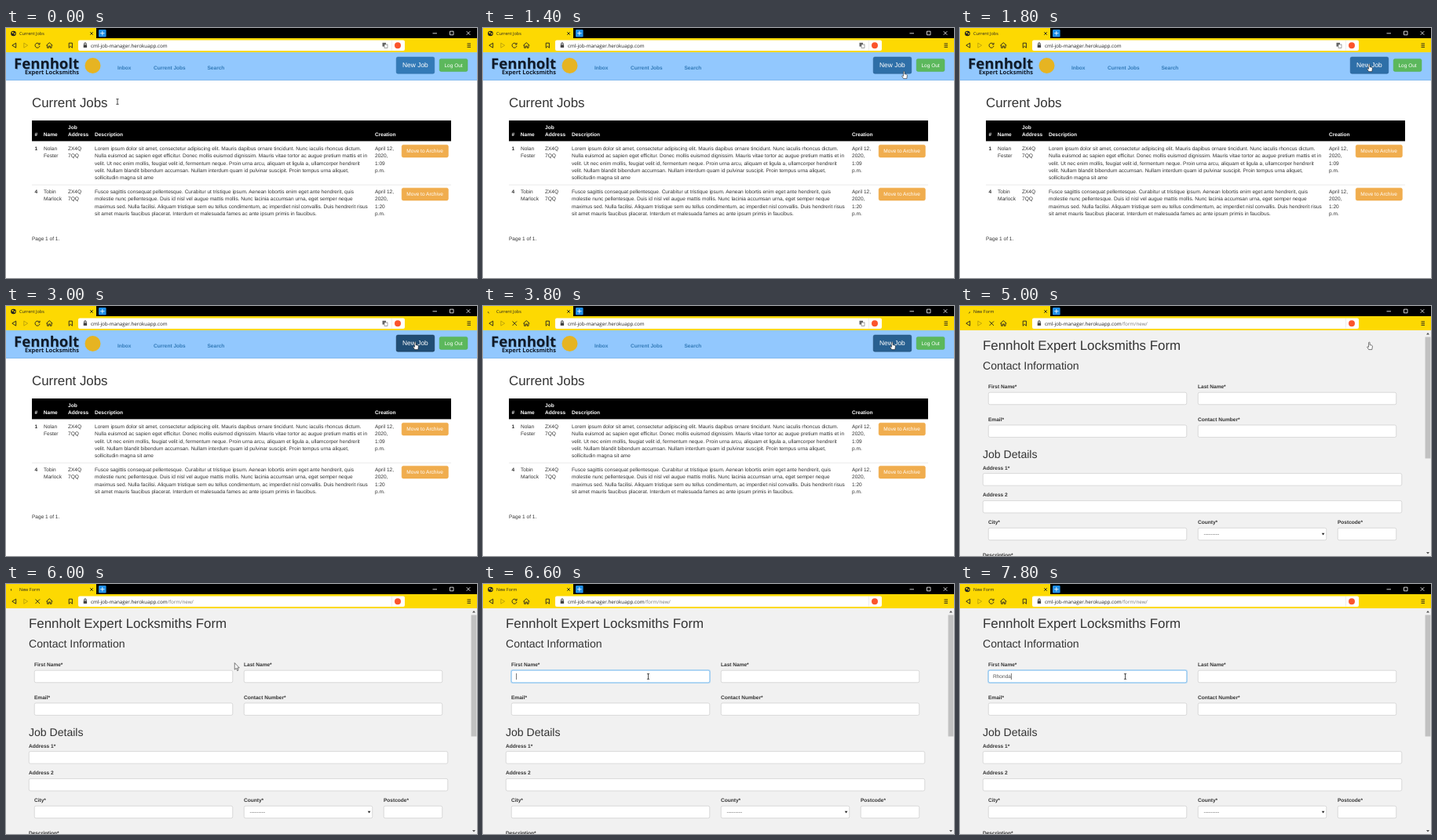
These frames come from a looping animation (600x319 px, 8000 ms). An HTML page:

```html
<!DOCTYPE html>
<html lang="en">
<head>
<meta charset="utf-8">
<title>Job manager</title>
<style>
  html, body { margin: 0; width: 100%; height: 100%; overflow: hidden; background: #fff; }
  svg { display: block; width: 100%; height: 100%; }
  text { font: 6.56px "Liberation Sans", Arial, sans-serif; fill: #333; text-rendering: geometricPrecision; }
  .b { font-weight: bold; }
  .white { fill: #fff; }
  .nav { font-weight: bold; fill: #337ab7; }
  .h1 { font-size: 16.87px; }
  .h2 { font-size: 14.06px; }
  .big { font-size: 8.43px; fill: #fff; }
  .grey { fill: #555; }
  .ui { font: 5.5px "Open Sans", sans-serif; fill: #222; }
  .url { font: 6.28px "Open Sans", sans-serif; fill: #222; }
  .path { fill: #777; }
  .logo { font: bold 18.6px "Open Sans", sans-serif; fill: #101a28; }
  .tagline { font: bold 7.5px "Open Sans", sans-serif; fill: #101a28; }
  .line { fill: none; stroke: #222; stroke-width: .9; }
  .pale { fill: none; stroke: #fff; stroke-width: .8; }
</style>
</head>
<body>
<svg id="stage" viewBox="0 0 600 319" preserveAspectRatio="none"></svg>
<script>
const LOOP = 8000, STEP = 200, LINE = 9.37;
const PRESS = 3000, RELEASE = 3200, COMMIT = 4800, SHOW_FORM = 5000, FOCUS = 6600;
const TYPED = 'Rhonda';

const text = (x, y, s, cls = '') => `<text x="${x}" y="${y}" class="${cls}">${s}</text>`;
const lines = (x, y, list, cls) => list.map((s, i) => text(x, y + i * LINE, s, cls)).join('');
const box = (x, y, w, h, fill, extra = '') =>
  `<rect x="${x}" y="${y}" width="${w}" height="${h}" fill="${fill}" ${extra}/>`;
const path = (d, cls = 'line', extra = '') => `<path d="${d}" class="${cls}" ${extra}/>`;
const group = (id, content, extra = '') => `<g id="${id}" ${extra}>${content}</g>`;
const button = (x, y, w, h, fill, border, extra = '') =>
  box(x, y, w, h, fill, `rx="2" stroke="${border}" stroke-width=".5" ${extra}`);
const field = (x, y, w, extra = '') =>
  box(x + .25, y + .25, w - .5, 15.5, '#fff', `rx="1.9" stroke="#c4c4c4" stroke-width=".6" ${extra}`);

function browserBar() {
  return box(0, 0, 600, 14, '#000') + box(0, 0, 115, 14, '#fdd902') + box(0, 13, 600, 18, '#fdd902')
    + group('globe', '<circle cx="9.5" cy="7" r="3.3" fill="#222"/>'
      + path('M7.3 5.6L9 4.8 9.8 6 8.4 7.4ZM10.4 6.5L12 6.2 11.3 8.6 10 8.3Z', '', 'fill="#fdd902"'))
    + group('spinner', path('M9.5 4A3 3 0 0 1 11.5 4.8', 'line'))
    + text(17, 9, '', 'ui').replace('<text', '<text id="tabTitle"')
    + path('M107.2 5.2L110.8 8.8M110.8 5.2L107.2 8.8')
    + box(118, 2, 9.6, 9.4, '#1f8fe8', 'rx="1.2"') + path('M122.8 4V9.4M120.1 6.7H125.5', 'pale')
    + path('M543.5 6.8H549M565.5 4.2H570V8.8H565.5ZM586.7 4.2L591.3 8.8M591.3 4.2L586.7 8.8', 'pale')
    + path('M12.7 19.2V25.2L7.8 22.2Z')
    + path('M22.8 19.2V25.2L27.6 22.2Z', 'line', 'opacity=".3"')
    + group('reload', path('M42.5 20.5A3 3 0 1 0 43 22.8M43 18.8V21H40.8'))
    + group('stop', path('M37.5 19.5L43 25M43 19.5L37.5 25'))
    + path('M51.3 22.3L55.3 18.7 59.3 22.3M52.6 21.6V25.3H54.4V23H56.2V25.3H58V21.6')
    + path('M80.2 19.2H84.4V25.3L82.3 23.3 80.2 25.3Z')
    + box(92, 15.6, 416, 13.4, '#fff', 'rx="2"')
    + box(98.7, 21.4, 4.4, 3.6, '#444') + path('M99.7 21.5V20A1.2 1.2 0 0 1 102.1 20V21.5')
    + `<text x="108" y="24.5" class="url">cml-job-manager.herokuapp.com<tspan id="urlPath" class="path">/form/new/</tspan></text>`
    + group('translate', box(479.5, 18.8, 4.5, 4.8, '#666') + box(482, 21, 4, 4.4, '#fff', 'stroke="#666" stroke-width=".6"'))
    + box(491, 16, .5, 12.6, '#ddd') + '<circle cx="499" cy="22.2" r="4" fill="#fb542b"/>'
    + path('M587.5 20H592M587.5 22.2H592M587.5 24.4H592');
}

function jobRow(y, id, name, date, description) {
  return text(36.5, y, id, 'b') + lines(48, y, name) + lines(79, y, ['ZX4Q', '7QQ'])
    + lines(113, y, description) + lines(470, y, date)
    + button(504.2, y - 6.8, 59.2, 15.8, '#f0ad4e', '#eea236') + text(510.3, y + 3.4, 'Move to Archive', 'white');
}

function jobsPage() {
  return box(0, 31, 600, 288, '#fff') + box(0, 31, 600, 36, '#92c8fe') + box(0, 66.3, 600, .7, '#80b5e8')
    + text(10.8, 53, 'Fennholt', 'logo').replace('<text', '<text style="fill:#6c9ac4"')
    + text(10, 52.2, 'Fennholt', 'logo') + text(24, 59.3, 'Expert Locksmiths', 'tagline')
    + '<circle cx="110.5" cy="48" r="10" fill="#e6b422"/>'
    + text(142, 53, 'Inbox', 'nav') + text(188, 53, 'Current Jobs', 'nav') + text(256.5, 53, 'Search', 'nav')
    + button(497.2, 37, 48.6, 21.2, '#337ab7', '#2e6da4', 'id="newJob"') + text(505, 50.3, 'New Job', 'big')
    + button(552.2, 39.4, 35.8, 16, '#5cb85c', '#4cae4c') + text(558.4, 49.8, 'Log Out', 'white')
    + text(33, 100.7, 'Current Jobs', 'h1')
    + box(33, 118, 534, 26.4, '#000')
    + text(36.5, 138.2, '#', 'b white') + text(47.8, 138.2, 'Name', 'b white')
    + lines(79, 128.8, ['Job', 'Address'], 'b white')
    + text(113, 138.2, 'Description', 'b white') + text(470, 138.2, 'Creation', 'b white')
    + jobRow(156, '1', ['Nolan', 'Fester'], ['April 12,', '2020,', '1:09', 'p.m.'], [
      'Lorem ipsum dolor sit amet, consectetur adipiscing elit. Mauris dapibus ornare tincidunt. Nunc iaculis rhoncus dictum.',
      'Nulla euismod ac sapien eget efficitur. Donec mollis euismod dignissim. Mauris vitae tortor ac augue pretium mattis et in',
      'velit. Ut nec enim mollis, feugiat velit id, fermentum neque. Proin urna arcu, aliquam et ligula a, ullamcorper hendrerit',
      'velit. Nullam blandit bibendum accumsan. Nullam interdum quam id pulvinar suscipit. Proin tempus urna aliquet,',
      'sollicitudin magna sit ame'])
    + box(33, 199.8, 534, .6, '#ddd')
    + jobRow(211, '4', ['Tobin', 'Marlock'], ['April 12,', '2020,', '1:20', 'p.m.'], [
      'Fusce sagittis consequat pellentesque. Curabitur ut tristique ipsum. Aenean lobortis enim eget ante hendrerit, quis',
      'molestie nunc pellentesque. Duis id nisl vel augue mattis mollis. Nunc lacinia accumsan urna, eget semper neque',
      'maximus sed. Nulla facilisi. Aliquam tristique sem eu tellus condimentum, ac imperdiet nisl convallis. Duis hendrerit risus',
      'sit amet mauris faucibus placerat. Interdum et malesuada fames ac ante ipsum primis in faucibus.'])
    + text(33, 271, 'Page 1 of 1.');
}

function formPage() {
  const labels = [[36, 105, 'First Name*'], [303, 105, 'Last Name*'], [36, 146.8, 'Email*'],
    [303, 146.8, 'Contact Number*'], [29, 208.8, 'Address 1*'], [29, 243.4, 'Address 2'],
    [36, 278, 'City*'], [303, 278, 'County*'], [481, 278, 'Postcode*'], [29, 320.3, 'Description*']];
  const fields = [[303, 110, 253], [36, 151.7, 253], [303, 151.7, 253], [29, 213.4, 534],
    [29, 248.2, 534], [36, 283, 253], [303, 283, 164], [481, 283, 75]];
  return box(0, 31, 600, 288, '#f1f1f1')
    + text(29, 55.8, 'Fennholt Expert Locksmiths Form', 'h1')
    + text(29, 81.4, 'Contact Information', 'h2') + text(29, 194.3, 'Job Details', 'h2')
    + labels.map(([x, y, s]) => text(x, y, s, 'b')).join('')
    + box(35, 109, 255, 18, '#b8d9f2', 'id="glow" rx="3"')
    + field(36, 110, 253, 'id="firstName"') + fields.map(f => field(...f)).join('')
    + text(42, 120.3, '', 'grey').replace('<text', '<text id="typed"')
    + box(42, 114, .6, 8, '#222', 'id="caret"')
    + text(310.5, 293, '---------', 'grey') + path('M460.8 289.8H464.4L462.6 292.6Z', '', 'fill="#222"')
    + box(592, 31, 8, 288, '#f1f1f1') + box(592.6, 39.5, 6.8, 155, '#c1c1c1')
    + path('M594 36.5L596 34 598 36.5ZM594 314L596 316.5 598 314Z', '', 'fill="#505050"');
}

const cursors = {
  beam: path('M-1.6 -3.3H1.6M-1.6 3.3H1.6M0 -3.3V3.3', 'line', 'style="stroke-width:.8"'),
  arrow: path('M0 0V8.6L2 6.8 3.4 10 4.8 9.4 3.4 6.4H6Z', '', 'fill="#fff" stroke="#222" stroke-width=".6"'),
  hand: path('M-1.4 -4.4Q-.6 -5.2 .1 -4.4V-1.3L2.6 -.8Q3.5 -.5 3.4 .8L2.8 4.6H-1.3L-3.3 1.4Q-3.2 .2 -1.4 1.4Z',
    '', 'fill="#fff" stroke="#222" stroke-width=".6"')
};

document.getElementById('stage').innerHTML = group('jobs', jobsPage()) + group('form', formPage())
  + browserBar() + group('cursor', Object.entries(cursors).map(([id, shape]) => group(id, shape)).join(''));

const el = Object.fromEntries([...document.querySelectorAll('[id]')].map(node => [node.id, node]));
const show = (node, on) => node.setAttribute('visibility', on ? 'visible' : 'hidden');

// Each move: start time, end time, from, to
const moves = [
  [0, 600, [142, 94], [566, 89]],
  [800, 1400, [566, 89], [537, 60]],
  [1400, 1800, [537, 60], [522, 51]],
  [5200, 6400, [522, 51], [210.5, 118]]
];

function cursorAt(t) {
  const [start, end, from, to] = moves.filter(m => t >= m[0]).pop();
  const p = Math.min(1, (t - start) / (end - start));
  const eased = p * p * (3 - 2 * p);
  return from.map((v, i) => v + (to[i] - v) * eased);
}

function cursorShape(t) {
  if (t < STEP || t >= 6400) return 'beam';
  return t >= 1400 && t <= SHOW_FORM ? 'hand' : 'arrow';
}

function buttonColors(t) {
  if (t < 1400) return ['#337ab7', '#2e6da4'];
  if (t < PRESS) return ['#2e6fa8', '#25588a'];
  return t < RELEASE ? ['#204d74', '#122b40'] : ['#286090', '#1c4468'];
}

function draw(now) {
  const t = Math.floor(now % LOOP / STEP) * STEP;
  const loading = t >= RELEASE && t < FOCUS, committed = t >= COMMIT;
  const focused = t >= FOCUS, formShown = t >= SHOW_FORM;

  show(el.jobs, !formShown);
  show(el.form, formShown);
  show(el.globe, !loading);
  show(el.spinner, loading);
  show(el.reload, !loading);
  show(el.stop, loading);
  show(el.translate, !committed);
  show(el.urlPath, committed);
  el.spinner.setAttribute('transform', `rotate(${(t - COMMIT) / STEP * 100} 9.5 7)`);
  el.tabTitle.textContent = committed ? 'New Form' : 'Current Jobs';

  const [fill, border] = buttonColors(t);
  el.newJob.setAttribute('fill', fill);
  el.newJob.setAttribute('stroke', border);

  show(el.glow, focused);
  show(el.caret, focused);
  el.firstName.setAttribute('stroke', focused ? '#66afe9' : '#c4c4c4');
  el.typed.textContent = TYPED.slice(0, Math.max(0, (t - FOCUS) / STEP));
  el.caret.setAttribute('x', 42 + el.typed.getComputedTextLength());

  const [x, y] = cursorAt(t), shape = cursorShape(t);
  el.cursor.setAttribute('transform', `translate(${x} ${y})`);
  for (const id in cursors) show(el[id], id === shape);
}

const began = performance.now();
function tick() {
  draw(performance.now() - began);
  requestAnimationFrame(tick);
}
tick();
</script>
</body>
</html>
```
